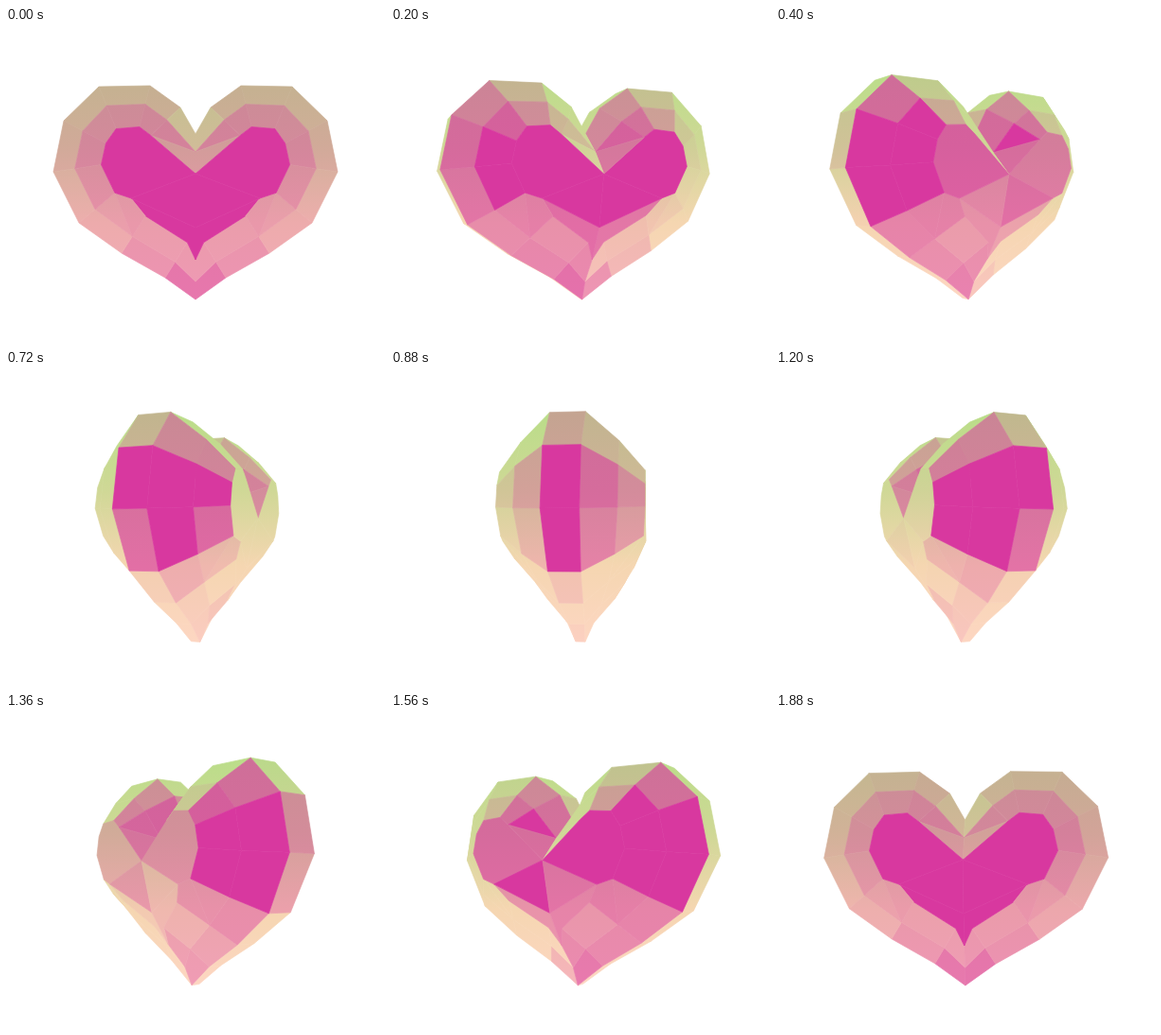
An HTML page with a canvas for the animation above (1920 ms loop, 400 px wide and 333 px high).

```html
<!DOCTYPE html>
<html>
<head>
<meta charset="utf-8">
<title>Turning heart</title>
<style>
html, body { margin: 0; width: 100%; height: 100%; overflow: hidden; background: #fff; }
canvas { display: block; }
</style>
</head>
<body>
<canvas id="stage" width="400" height="333"></canvas>
<script>
const ctx = document.getElementById('stage').getContext('2d');
const LOOP = 1920, STEP = 40, HALF_TURN = 1900;
const DIST = 610, CX = 200, CY = 178, TIP = 287;

// Left half of the outline, from the cleft to the tip; x counts from the axis.
const rim = [[0, 112], [-16, 84], [-48, 61], [-102, 62], [-139, 98],
  [-150, 152], [-123, 206], [-78, 238], [-32, 264], [0, TIP]];
const last = rim.length - 1;
const mirror = ([x, y]) => [-x, y];

// A point seen from the front at x, y; the body thins out toward the tip.
function place([x, y], depth) {
  const z = 5 + depth * Math.sin(Math.min(1, (TIP - y) / 130) * Math.PI / 2);
  const s = 1 - z / DIST;
  return [x * s, (y - CY) * s, z];
}

// Move an outline corner inward, at right angles to its neighbours' chord.
function inset(i, amount) {
  const [x, y] = rim[i];
  const prev = i ? rim[i - 1] : mirror(rim[1]);
  const next = i < last ? rim[i + 1] : mirror(rim[last - 1]);
  const tx = next[0] - prev[0], ty = next[1] - prev[1];
  const w = amount * (42 - 0.06 * x) / Math.hypot(tx, ty);
  return [x + ty * w, y - tx * w];
}

// Rings: A is the edge, B the bevel, C the border of the cap with D and E in it.
const points = { D: place([-68, 180], 66), E: place([0, 211], 64) };
for (let i = 0; i <= last; i++) {
  points['A' + i] = place(rim[i], 11);
  points['B' + i] = place(inset(i, 0.45), 40);
  points['C' + i] = place(inset(i, 1), 63);
}

const quarter = ['B0 B1 C1', 'B0 C1 C0', 'B6 B7 C6', 'B7 C7 D C6',
  'C0 C1 C2 C3 C4 C5 C6 D', 'C7 C8 C9 E D', 'C0 D E'].map(f => f.split(' '));
const band = (p, q, i) => quarter.push([p + i, p + (i + 1), q + (i + 1), q + i]);
for (let i = 0; i < last; i++) {
  band('A', 'B', i);
  if (i % 6) band('B', 'C', i);
}

// Mirror the quarter, then close the outer edge with a strip.
const faces = [];
const addFace = (face, flip) => faces.push(flip ? face.reverse() : face);
for (const sx of [1, -1]) {
  const at = (name, sz) => {
    const [x, y, z] = points[name];
    return [x * sx, y, z * sz];
  };
  for (const sz of [1, -1])
    for (const f of quarter) addFace(f.map(n => at(n, sz)), sx * sz < 0);
  for (let i = 0; i < last; i++) {
    const a = 'A' + i, b = 'A' + (i + 1);
    addFace([at(b, 1), at(a, 1), at(a, -1), at(b, -1)], sx < 0);
  }
}

// Faces turned away take on a glow that runs from green to peach.
const BASE = [216, 56, 159];
const GLOW = [[184, 230, 136], [206, 224, 150], [246, 222, 178], [255, 222, 196]];

function paint(k) {
  const g = ctx.createLinearGradient(0, 45, 0, TIP);
  GLOW.forEach((glow, i) => {
    const rgb = BASE.map((v, j) => Math.round(v + (glow[j] - v) * k));
    g.addColorStop(i / (GLOW.length - 1), `rgb(${rgb})`);
  });
  return g;
}

function view(face, cos, sin) {
  const p = face.map(([x, y, z]) => [x * cos + z * sin, y, z * cos - x * sin]);
  const n = [0, 0, 0], mid = [0, 0, 0];
  p.forEach((a, i) => {
    const b = p[(i + 1) % p.length];
    for (let j = 0; j < 3; j++) {
      const u = (j + 1) % 3, v = (j + 2) % 3;
      n[j] -= a[u] * b[v] - a[v] * b[u];
      mid[j] += a[j] / p.length;
    }
  });
  const eye = [-mid[0], -mid[1], DIST - mid[2]];
  const far = Math.hypot(...eye), size = Math.hypot(...n);
  const facing = (n[0] * eye[0] + n[1] * eye[1] + n[2] * eye[2]) / (size * far);
  return { p, far, facing, down: Math.max(0, n[1] / size) };
}

function draw(time) {
  const t = Math.floor(time % LOOP / STEP) * STEP;
  const angle = Math.PI * t / HALF_TURN;
  const cos = Math.cos(angle), sin = Math.sin(angle);
  ctx.fillStyle = '#fff';
  ctx.fillRect(0, 0, 400, 333);
  ctx.lineWidth = 0.7;
  ctx.lineJoin = 'round';
  const visible = faces.map(f => view(f, cos, sin))
    .filter(f => f.facing > 0)
    .sort((a, b) => b.far - a.far);
  for (const { p, facing, down } of visible) {
    const shade = 0.22 + (0.81 - facing) * 1.5 + 0.2 * down;
    const k = facing > 0.81 ? 0 : Math.min(0.95, shade);
    ctx.fillStyle = ctx.strokeStyle = paint(k);
    ctx.beginPath();
    for (const [x, y, z] of p) {
      const s = DIST / (DIST - z);
      ctx.lineTo(CX + x * s, CY + y * s);
    }
    ctx.closePath();
    ctx.fill();
    ctx.stroke();
  }
}

const start = performance.now();
function tick() {
  draw(performance.now() - start);
  requestAnimationFrame(tick);
}
tick();
</script>
</body>
</html>
```
